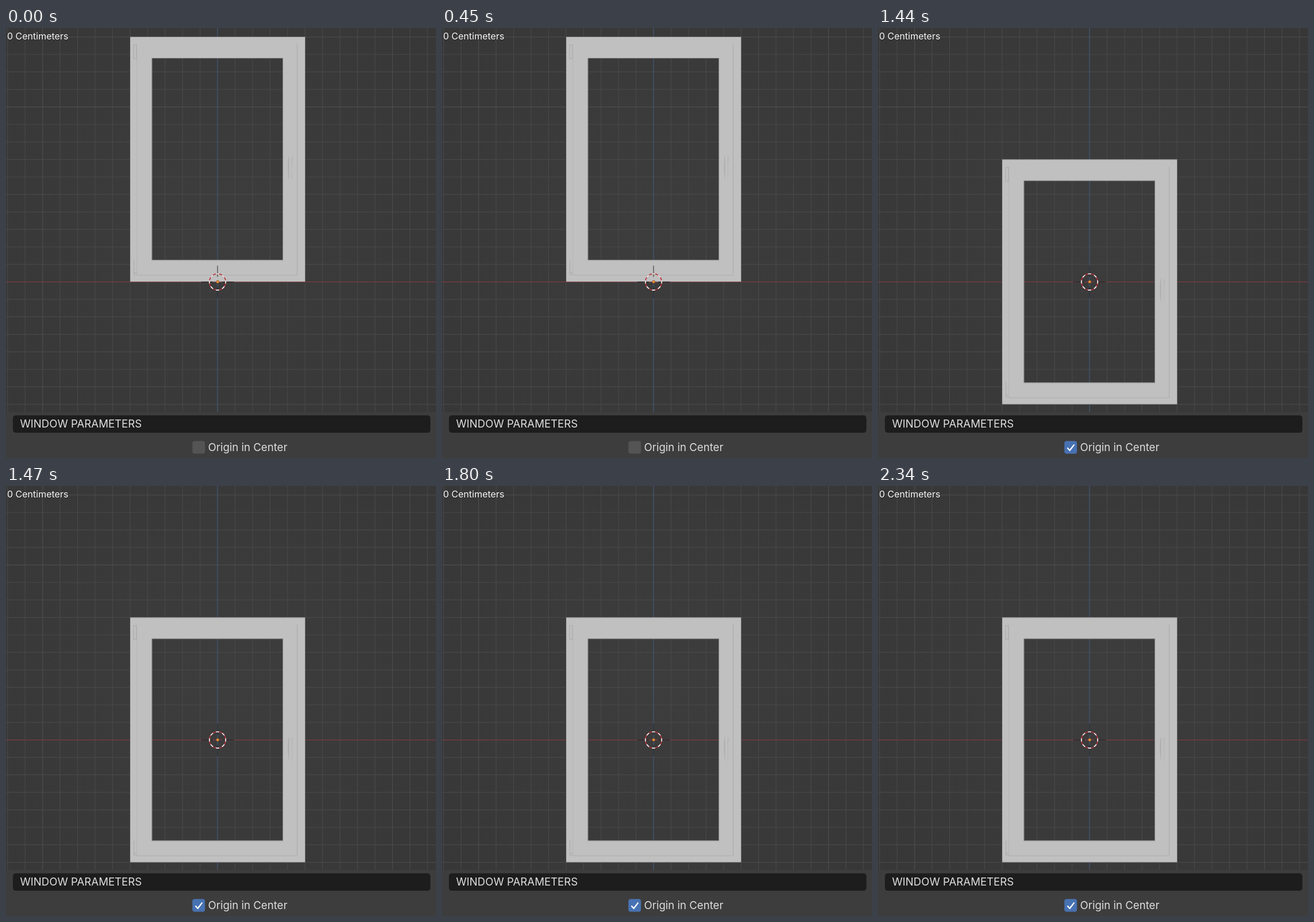
These frames come from a looping animation (748x748 px, 2700 ms). An HTML page:

```html
<!DOCTYPE html>
<html lang="en">
<head>
<meta charset="utf-8">
<title>Window parameters</title>
<style>
  html, body { margin: 0; width: 100%; height: 100%; overflow: hidden; background: #3d3d3d; }
  svg { display: block; width: 100vw; height: 100vh; }
  text { font-family: Inter, "Noto Sans", sans-serif; }
</style>
</head>
<body>
<svg viewBox="0 0 748 748">
  <defs>
    <radialGradient id="view" gradientUnits="userSpaceOnUse" cx="374" cy="334" r="500">
      <stop offset="0" stop-color="#3d3d3d"/>
      <stop offset="1" stop-color="#373737"/>
    </radialGradient>
    <linearGradient id="grip">
      <stop offset="0" stop-color="#a6a6a6"/>
      <stop offset=".45" stop-color="#c6c6c6"/>
      <stop offset="1" stop-color="#b1b1b1"/>
    </linearGradient>
  </defs>

  <rect width="748" height="668" fill="url(#view)"/>
  <path id="grid" stroke="#484848" stroke-width="1.2"/>
  <path id="major" stroke="#4d4d4d" stroke-width="1.2"/>
  <path d="M368 0V668" stroke="#425470" stroke-width="1.4"/>
  <path d="M0 441.6H748" stroke="#7c3b45" stroke-width="1.4"/>

  <g id="frame" fill="none">
    <path fill="#c0c0c0" fill-rule="evenodd" d="M216 15.5H520.3V441.3H216ZM253.8 52.3V404H481.8V52.3Z"/>
    <path d="M254 404V52.6H481.6V404" stroke="#858585"/>
    <path d="M254 403.8H481.6" stroke="#989898"/>
    <path d="M227.5 28V430" stroke="#b5b5b5"/>
    <path d="M228 430H506.5" stroke="#adadad"/>
    <path d="M506.5 28V430" stroke="#a9a9a9"/>
    <path d="M216.4 16V441" stroke="#b2b2b2" stroke-width=".8"/>
    <g stroke="#a8a8a8" stroke-width=".9">
      <path d="M222 29.5H227V53.5H222Z"/>
      <path d="M222.5 403V429H227.5M222.5 425.5H227"/>
    </g>
    <path fill="url(#grip)" d="M491.2 226Q491 222.5 495 222.5Q499 222.5 498.8 227Q496.8 245 497.6 262Q497.4 266 494.2 266Q491.8 265.5 491.2 258Q489.8 241 491.2 226Z"/>
    <path fill="#c0c0c0" d="M493.6 228Q492.4 242 493.4 258Q494.4 262 495.4 259Q494.8 243 496.4 228Z"/>
  </g>

  <g fill="none">
    <path d="M368 413.5V433M368 450V470M340 441.6H359.5M376.5 441.6H396.5" stroke="#222" stroke-opacity=".8" stroke-width="1.2"/>
    <circle cx="368" cy="441.7" r="14.2" stroke="#b5343a" stroke-width="1.7"/>
    <circle cx="368" cy="441.7" r="14.2" stroke="#f2f2f2" stroke-width="1.7" pathLength="16" stroke-dasharray="1" stroke-dashoffset=".5"/>
    <circle cx="368.2" cy="441.6" r="2.5" fill="#ee9238" stroke="#6b3f20" stroke-width=".6"/>
  </g>

  <text x="2.6" y="21" font-size="16" fill="#000" opacity=".55">0 Centimeters</text>
  <text x="2" y="20.3" font-size="16" fill="#fff">0 Centimeters</text>

  <rect y="668" width="748" height="80" fill="#3d3d3d"/>
  <rect x="12" y="673.7" width="726.3" height="30.4" rx="5" fill="#1d1d1d"/>
  <text x="24.5" y="695.2" font-size="18.6" fill="#dedede">WINDOW PARAMETERS</text>
  <rect x="324.3" y="718.5" width="21.8" height="22" rx="4" fill="#545454"/>
  <g id="tick">
    <rect x="324.3" y="718.5" width="21.8" height="22" rx="4" fill="#4772b3"/>
    <path d="M329.4 730.3L333.6 734.7L341.4 724.6" fill="none" stroke="#fff" stroke-width="2.2"/>
  </g>
  <text x="351.5" y="735.8" font-size="18.6" fill="#dedede">Origin in Center</text>
</svg>
<script>
  const LOOP = 2700, SWITCH = 1410, STEP = 30.43;
  const byId = id => document.getElementById(id);

  // Grid lines spread out from the world origin; every tenth one is major.
  const paths = { grid: "", major: "" };
  for (let i = -14; i <= 14; i++) {
    if (!i) continue;
    const kind = i % 10 ? "grid" : "major";
    const x = 368 + i * STEP, y = 441.6 + i * STEP;
    if (x > 0 && x < 748) paths[kind] += `M${x} 0V668`;
    if (y < 668) paths[kind] += `M0 ${y}H748`;
  }
  for (const id in paths) byId(id).setAttribute("d", paths[id]);

  // Hold the first state, then jump to the second.
  const toggle = (id, prop, off, on) => {
    const offset = SWITCH / LOOP;
    const keys = [[0, off], [offset, off], [offset, on], [1, on]]
      .map(([offset, value]) => ({ offset, [prop]: value }));
    byId(id).animate(keys, { duration: LOOP, iterations: Infinity });
  };
  toggle("frame", "transform", "translate(0, 0)", "translate(0, 213.2px)");
  toggle("tick", "opacity", 0, 1);
</script>
</body>
</html>
```
